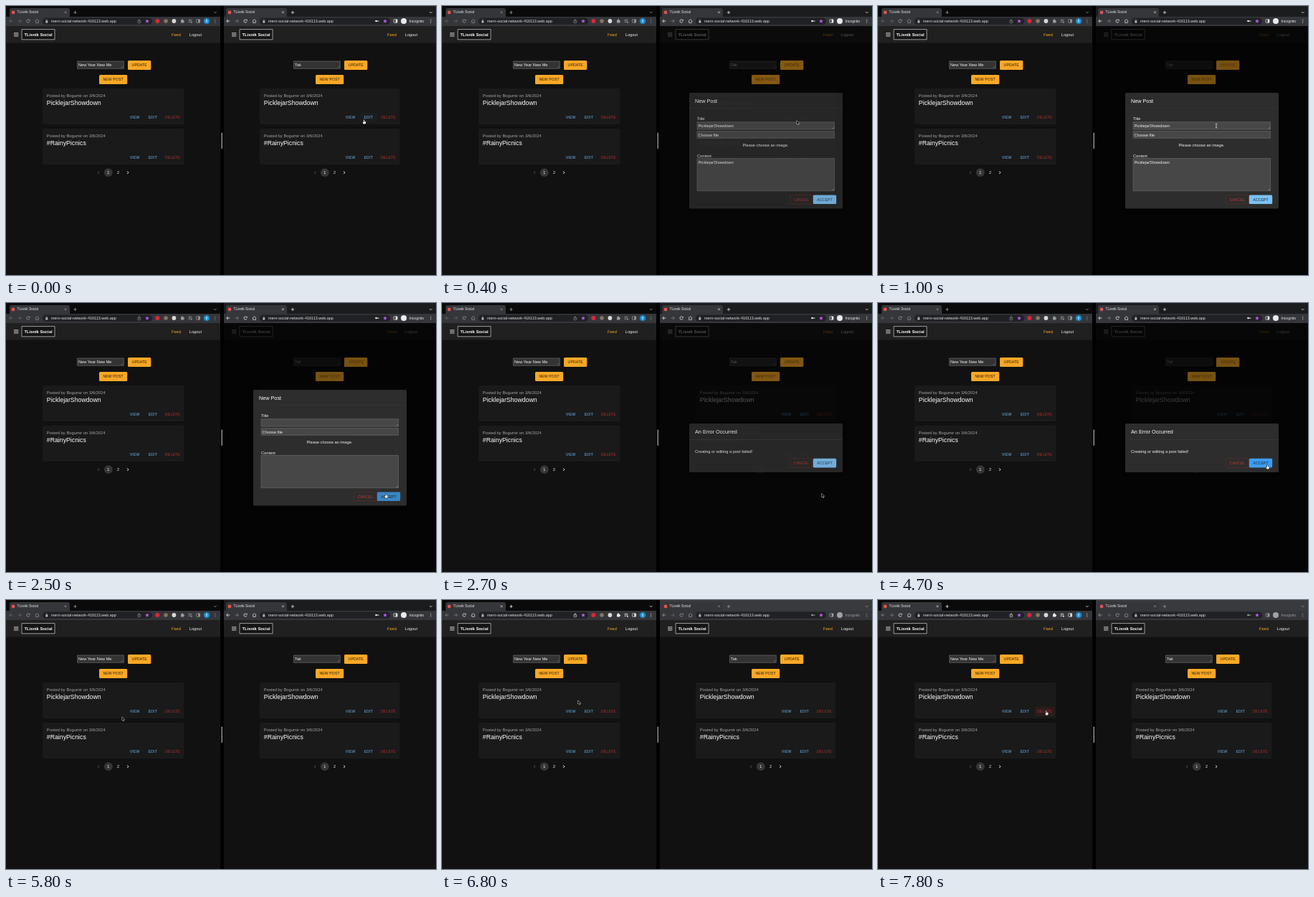
Recreate the animation shown at these times as an HTML page with a canvas. Size 600x375 px, loop 8 s.

```html
<!DOCTYPE html>
<html lang="en">
<head>
<meta charset="utf-8">
<title>TLisnik Social</title>
<style>
html, body { margin: 0; width: 100%; height: 100%; overflow: hidden; background: #000; }
canvas { display: block; width: 600px; height: 375px; }
</style>
</head>
<body>
<canvas id="stage"></canvas>
<script>
const LOOP = 8000;
const FONT = '"Liberation Sans", Arial, sans-serif';
const BRAND = 'TLisnik Social';
const TOPIC = 'PicklejarShowdown';
const ORANGE = '#f9a825', BLUE = '#6cb6ee', RED = '#b5302a';

const canvas = document.getElementById('stage');
const ctx = canvas.getContext('2d');
const dpr = window.devicePixelRatio || 1;
canvas.width = 600 * dpr;
canvas.height = 375 * dpr;

// Pointer stops: time, x, y, shape
const path = [
  [0, 499.5, 158.5, 'hand'], [250, 499.5, 158.5, 'hand'],
  [850, 472, 167, 'beam'], [1350, 472, 167, 'beam'],
  [1600, 440, 219, 'beam'], [1950, 440, 219, 'beam'],
  [2350, 530, 265.7, 'hand'], [2590, 530, 265.7, 'arrow'],
  [3950, 530, 265.7, 'arrow'], [4500, 543.3, 225.5, 'hand'],
  [4920, 543.3, 225.5, 'arrow'], [5700, 162, 163, 'arrow'],
  [6300, 164, 162, 'arrow'], [6500, 190, 140, 'arrow'],
  [6800, 190, 140, 'arrow'], [7300, 235, 154.5, 'hand'],
  [LOOP, 235, 154.5, 'hand']
];

const clamp = v => Math.max(0, Math.min(1, v));
const ease = p => p * p * (3 - 2 * p);
const fade = (t, from, span) => 1 - Math.pow(1 - clamp((t - from) / span), 3);
const within = (t, a, b) => t >= a && t < b;

function rect(x, y, w, h, color, r = 0) {
  ctx.fillStyle = color;
  ctx.beginPath();
  ctx.roundRect(x, y, w, h, r);
  ctx.fill();
}

function frame(x, y, w, h, color, r = 0, lw = 0.6) {
  ctx.strokeStyle = color;
  ctx.lineWidth = lw;
  ctx.beginPath();
  ctx.roundRect(x, y, w, h, r);
  ctx.stroke();
}

function dot(x, y, r, color) {
  ctx.fillStyle = color;
  ctx.beginPath();
  ctx.arc(x, y, r, 0, 7);
  ctx.fill();
}

function line(points, color, lw = 0.8) {
  ctx.strokeStyle = color;
  ctx.lineWidth = lw;
  ctx.beginPath();
  points.forEach(([x, y], i) => i ? ctx.lineTo(x, y) : ctx.moveTo(x, y));
  ctx.stroke();
}

function shape(points, fill, edge) {
  ctx.beginPath();
  points.forEach(([x, y]) => ctx.lineTo(x, y));
  ctx.closePath();
  if (edge) {
    ctx.strokeStyle = edge;
    ctx.lineWidth = 0.9;
    ctx.lineJoin = 'round';
    ctx.stroke();
  }
  ctx.fillStyle = fill;
  ctx.fill();
}

function text(s, x, y, size, color, { bold = false, align = 'left', gap = 0 } = {}) {
  ctx.font = `${bold ? 'bold ' : ''}${size}px ${FONT}`;
  ctx.letterSpacing = gap + 'px';
  ctx.textAlign = align;
  ctx.textBaseline = 'alphabetic';
  ctx.fillStyle = color;
  ctx.fillText(s, x, y + size * 0.355);
}

const caps = (s, x, y, color) => text(s, x, y, 5.15, color, { align: 'center', gap: 0.12 });

function button(s, x, y, w, h, bg, color) {
  rect(x, y, w, h, bg, 1.6);
  caps(s, x + w / 2, y + h / 2, color);
}

function star(x, y, r, color) {
  const points = [];
  for (let i = 0; i < 10; i++) {
    const a = i * Math.PI / 5 - Math.PI / 2, q = i % 2 ? r * 0.45 : r;
    points.push([x + q * Math.cos(a), y + q * Math.sin(a)]);
  }
  shape(points, color);
}

function arrowIcon(x, y, dir, color) {
  line([[x - 2.3 * dir, y], [x + 2.3 * dir, y]], color);
  line([[x, y - 2.2], [x + 2.3 * dir, y], [x, y + 2.2]], color);
}

function chrome(x, w, active, isPrivate, strip) {
  const icon = active ? '#e8eaed' : '#999b9e';
  const off = active ? '#7f8184' : '#66686b';
  const right = x + w;
  rect(x, 0, w, 16, strip);
  const tab = isPrivate ? x + 3 : 5;
  const tabEnd = isPrivate ? x + 88 : 89;
  rect(tab, 3, tabEnd - tab, 13, '#35363a', [3, 3, 0, 0]);
  rect(x, 15, w, 13, '#35363a');
  dot(tab + 5, 9, 2.4, '#e5524f');
  text(BRAND, tab + 10.6, 8.8, 4.75, '#e8eaed');
  const cx = isPrivate ? 386.5 : 83;
  line([[cx - 1.4, 7.4], [cx + 1.4, 10.2]], icon, 0.7);
  line([[cx + 1.4, 7.4], [cx - 1.4, 10.2]], icon, 0.7);
  const px = isPrivate ? 400 : 96.5;
  line([[px - 2.2, 9], [px + 2.2, 9]], icon, 0.8);
  line([[px, 6.8], [px, 11.2]], icon, 0.8);
  line([[right - 9, 8], [right - 7.2, 9.8], [right - 5.4, 8]], icon);

  const nav = isPrivate ? 310 : 7;
  arrowIcon(nav, 21, -1, isPrivate ? icon : off);
  arrowIcon(nav + 12, 21, 1, off);
  ctx.strokeStyle = icon;
  ctx.lineWidth = 0.8;
  ctx.beginPath();
  ctx.arc(nav + 24, 21, 2.1, 0.4, 5.5);
  ctx.stroke();
  shape([[nav + 24.6, 20.4], [nav + 26.6, 20.4], [nav + 26.6, 18.4]], icon);
  const hx = nav + 36.5;
  line([[hx - 2.6, 21], [hx, 18.6], [hx + 2.6, 21]], icon, 0.7);
  line([[hx - 1.8, 20.6], [hx - 1.8, 23.4], [hx + 1.8, 23.4], [hx + 1.8, 20.6]], icon, 0.7);

  const pillEnd = isPrivate ? 536 : 204;
  rect(nav + 44, 16.6, pillEnd - nav - 44, 9.2, '#202124', 4.6);
  rect(nav + 48.3, 20.6, 3, 2.8, '#b5b7ba', 0.4);
  frame(nav + 49, 18.8, 1.6, 2, '#b5b7ba', 0.8, 0.5);
  text('mern-social-network-416113.web.app', nav + 56, 21, 5.46, '#e2e4e7');

  if (isPrivate) {
    dot(516.5, 21, 1.3, icon);
    rect(517, 20.6, 3.6, 0.9, icon);
    star(529, 21.2, 3, '#b65cf0');
    frame(541, 18.8, 5, 4.4, icon, 0.5, 0.7);
    rect(543.7, 18.8, 2.3, 4.4, icon);
    dot(555, 21, 4, active ? '#e8eaed' : '#a0a2a5');
    text('Incognito', 562.5, 21, 5.1, icon);
  } else {
    frame(184, 20, 3.6, 3.6, icon, 0.4, 0.6);
    line([[185.8, 22], [185.8, 18]], icon, 0.6);
    star(197, 21.2, 3, '#b65cf0');
    dot(211.3, 21, 3, '#d8283a');
    dot(223, 21, 2.8, '#89745f');
    dot(234.4, 21, 2.9, '#d9d9d9');
    rect(244, 19.5, 4, 4, icon, 0.6);
    dot(246, 19.2, 1, icon);
    dot(248.2, 21.5, 0.9, icon);
    for (let i = 0; i < 3; i++) rect(254.5, 18.8 + i * 1.7, i < 2 ? 4.8 : 2.6, 0.7, icon);
    shape([[258, 21.5], [260.5, 22.8], [258, 24]], icon);
    frame(265.6, 18.8, 5, 4.4, icon, 0.5, 0.7);
    rect(268.3, 18.8, 2.3, 4.4, icon);
    dot(280, 21, 4.3, '#1687c9');
    text('B', 280, 21, 4.6, '#fff', { align: 'center' });
  }
  for (let i = -1; i < 2; i++) dot(right - 7.3, 21 + i * 2, 0.6, icon);
}

function card(x, w, vx, y, title, hover) {
  rect(x, y, w, 50, '#1a1a1a', 1.5);
  text('Posted by Bogumir on 3/6/2024', x + 5.8, y + 10, 5.85, '#a5a5a5');
  text(title, x + 5.8, y + 19.7, 8.75, '#fff');
  const ay = y + 40.5;
  if (hover === 'edit') rect(vx + 13.5, ay - 6.5, 24, 13, 'rgba(108,182,238,.03)', 1.5);
  if (hover === 'delete') rect(vx + 39, ay - 6.5, 28, 13, 'rgba(190,45,40,.12)', 1.5);
  caps('VIEW', vx, ay, BLUE);
  caps('EDIT', vx + 25.3, ay, BLUE);
  caps('DELETE', vx + 52.8, ay, RED);
}

function orangeButtons(mid) {
  button('UPDATE', mid + 170, 76, 32.3, 13, ORANGE, '#241a08');
  button('NEW POST', mid + 130, 96, 39.2, 13, ORANGE, '#241a08');
}

function page(isRight, hover) {
  const x = isRight ? 304 : 0, w = isRight ? 296 : 299;
  const nav = isRight ? 301 : 0, mid = isRight ? 302 : 0;
  rect(x, 28, w, 347, '#111');
  rect(x, 28, w, 23.5, '#202020');
  for (let i = 0; i < 3; i++) rect(x + 11, 37.4 + i * 2.1, 6.4, 0.8, '#f0f0f0');
  rect(x + 22, 32.6, 46, 14.2, '#151515');
  frame(x + 22, 32.6, 46, 14.2, '#d0d0dc', 0, 0.7);
  text(BRAND, x + 45, 39.8, 5.8, '#fff', { bold: true, align: 'center' });
  text('Feed', nav + 231, 40, 5.65, ORANGE);
  text('Logout', nav + 255.8, 40, 5.65, '#f2f2f2');

  rect(mid + 99.5, 77, 64.8, 10.3, '#333');
  frame(mid + 99.5, 77, 64.8, 10.3, '#777', 0, 0.6);
  text(isRight ? 'Tak' : 'New Year New Me', mid + 101, 82.2, 5.65, '#f2f2f2');
  line([[mid + 161, 86.3], [mid + 163.3, 84]], '#aaa', 0.5);
  orangeButtons(mid);

  const cx = isRight ? 354 : 51, cw = isRight ? 195.5 : 197.5;
  card(cx, cw, nav + 179.6, 115, TOPIC, hover);
  card(cx, cw, nav + 179.6, 171, '#RainyPicnics');

  line([[mid + 130, 230.4], [mid + 128.3, 232.2], [mid + 130, 234]], '#666', 0.8);
  dot(mid + 142.8, 232.2, 5.9, '#363636');
  text('1', mid + 142.8, 232.2, 5.4, '#fff', { align: 'center' });
  text('2', mid + 156.4, 232.2, 5.4, '#f2f2f2', { align: 'center' });
  line([[mid + 169.2, 230.4], [mid + 170.9, 232.2], [mid + 169.2, 234]], '#fff', 0.9);
}

function field(y, h, value, selected) {
  rect(356, y, 191.5, h, '#474747');
  frame(356, y, 191.5, h, '#707070', 0, 0.6);
  if (selected) rect(357.3, y + 1.8, 50.5, 6.6, '#3b6ea8');
  text(value, 357.5, y + 5.3, 5.7, '#f2f2f2');
}

function grip(y) {
  line([[544.5, y], [547, y - 2.5]], '#aaa', 0.5);
  line([[546, y], [547, y - 1]], '#aaa', 0.5);
}

function dialog(y, h, title, rule) {
  ctx.shadowColor = 'rgba(0,0,0,.5)';
  ctx.shadowBlur = 5 * dpr;
  rect(345, y, 214, h, '#2d2d2d', 1.5);
  ctx.shadowBlur = 0;
  text(title, 353, y + 11.3, 7.25, '#fff');
  rect(345, y + rule, 214, 0.6, '#393939');
}

function actions(y, hover, press) {
  frame(485.6, y, 31.6, 12.6, '#6b2b28', 1.6, 0.6);
  caps('CANCEL', 501.5, y + 6.3, '#c8352e');
  button('ACCEPT', 517.8, y, 32.4, 12.6, press ? '#3b86c4' : hover ? '#3c9df0' : '#7dc0f3', '#15222e');
}

function editDialog(t) {
  dialog(121, 161.5, 'New Post', 21.5);
  text('Title', 356, 157, 5.7, '#f2f2f2');
  field(161.8, 10.2, t < 1250 ? TOPIC : '', within(t, 1060, 1250));
  grip(171.5);
  field(174.6, 9.6, 'Choose file');
  text('Please choose an image.', 451.5, 194.3, 5.7, '#f2f2f2', { align: 'center' });
  text('Content', 356, 208.6, 5.7, '#f2f2f2');
  field(212.5, 45.2, t < 1880 ? TOPIC : '', within(t, 1700, 1880));
  grip(257.2);
  actions(263.4, t > 2250, t > 2420);
}

function errorDialog(t) {
  dialog(168, 68, 'An Error Occurred', 22.3);
  text('Creating or editing a post failed!', 353, 206.6, 5.7, '#f2f2f2');
  actions(216.8, t > 4400, within(t, 4780, 4950));
}

function pointer(t) {
  let i = 0;
  while (i < path.length - 2 && t >= path[i + 1][0]) i++;
  const a = path[i], b = path[i + 1];
  const p = ease(clamp((t - a[0]) / (b[0] - a[0])));
  const x = a[1] + (b[1] - a[1]) * p, y = a[2] + (b[2] - a[2]) * p;
  const moving = a[1] !== b[1] || a[2] !== b[2];
  const kind = moving && p > 0.85 ? b[3] : moving && p > 0.1 ? 'arrow' : a[3];
  ctx.save();
  ctx.translate(x, y);
  if (kind === 'beam') {
    line([[-1.3, -3], [0, -2.5], [1.3, -3]], '#ddd', 0.7);
    line([[0, -2.6], [0, 2.6]], '#ddd', 0.8);
    line([[-1.3, 3], [0, 2.5], [1.3, 3]], '#ddd', 0.7);
  } else if (kind === 'hand') {
    shape([[-0.5, 0], [0.4, 0], [0.6, 2.2], [2.6, 2.8], [2.6, 4.6], [1.9, 6], [-0.6, 6],
      [-2, 3.9], [-1.6, 3.2], [-0.4, 4]], '#fff', '#000');
  } else {
    shape([[0, 0], [0, 5], [1.1, 4.1], [1.9, 5.8], [2.7, 5.4], [1.9, 3.8], [3.4, 3.6]], '#111', '#eee');
  }
  ctx.restore();
}

function layer(alpha, paint) {
  if (alpha <= 0) return;
  ctx.globalAlpha = alpha;
  paint();
  ctx.globalAlpha = 1;
}

function draw(t) {
  ctx.setTransform(dpr, 0, 0, dpr, 0, 0);
  rect(0, 0, 600, 375, '#000');
  const leftActive = t >= 6650;
  chrome(0, 299, leftActive, false, '#0a0a0b');
  chrome(304, 296, !leftActive, true, leftActive ? '#383a3d' : '#1b1c1e');
  page(false, t >= 7150 ? 'delete' : '');
  page(true, t < 300 ? 'edit' : '');

  const edit = fade(t, 300, 220) * (1 - fade(t, 2540, 90));
  const error = fade(t, 2600, 200) * (1 - fade(t, 4900, 200));
  const shade = Math.max(edit, error);
  layer(shade, () => rect(304, 28, 296, 347, 'rgba(0,0,0,.77)'));
  // The buttons stay brighter than the rest of the dimmed page
  layer(shade * 0.32, () => orangeButtons(302));
  layer(edit, () => editDialog(t));
  layer(error, () => errorDialog(t));

  rect(299, 0, 5, 375, '#000');
  rect(300.4, 176.5, 1.7, 22.5, '#858585', 0.9);
  pointer(t);
}

const start = performance.now();
function tick() {
  draw((performance.now() - start) % LOOP);
  requestAnimationFrame(tick);
}
tick();
</script>
</body>
</html>
```
